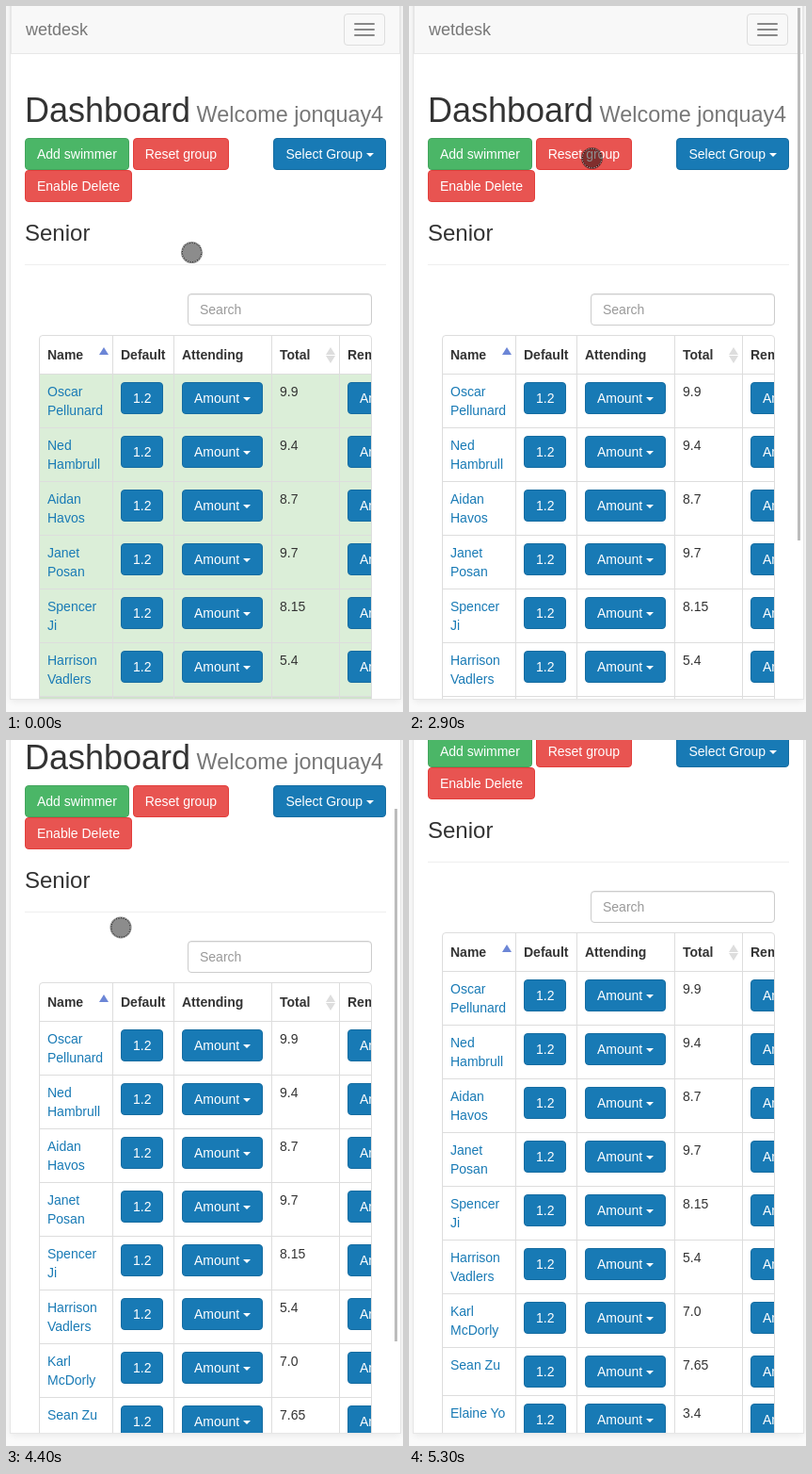
Animation of 422 by 749 pixels, one loop 5.8 s. Source, as an HTML page:

```html
<!DOCTYPE html>
<html lang="en">
<head>
<meta charset="utf-8">
<title>Dashboard</title>
<style>
* { box-sizing: border-box; }
html, body { margin: 0; width: 100%; height: 100%; overflow: hidden; }
body {
  position: relative; background: #fafafa; color: #333;
  font: 14px/20px "Liberation Sans", Arial, sans-serif;
}
#view {
  position: absolute; left: 5px; top: 0; width: 414px; height: 735px;
  overflow: hidden; background: #fff;
}
#edge {
  position: absolute; left: 5px; top: -10px; width: 414px; height: 745px;
  box-shadow: 0 0 0 1px #e6e6e6, 0 2px 8px rgba(0, 0, 0, .09);
}
#doc { position: absolute; left: -5px; top: 0; width: 422px; height: 960px; }
.at { position: absolute; white-space: nowrap; margin: 0; font-weight: 400; }
nav {
  position: absolute; left: 5px; top: -1px; width: 414px; height: 52px;
  background: #f8f8f8; border: 1px solid #e7e7e7;
}
.brand { left: 21px; top: 15px; font-size: 18px; color: #777; }
.toggle {
  left: 359px; top: 8px; width: 44px; height: 34px; padding: 9px 10px;
  border: 1px solid #ddd; border-radius: 4px;
}
.toggle i { display: block; height: 2px; margin-bottom: 4px; border-radius: 1px; background: #888; }
h1 { left: 20px; top: 91px; font-size: 36px; line-height: 39.6px; }
h1 small { font-size: 65%; line-height: 1; color: #777; }
h3 { left: 20px; top: 228px; font-size: 24px; line-height: 26.4px; }
.tools { position: absolute; left: 20px; top: 140px; width: 384px; }
.tools .right { float: right; }
.btn {
  display: inline-block; vertical-align: middle; padding: 6px 12px; white-space: nowrap;
  color: #fff; background: #187ab5; border: 1px solid #156ca1; border-radius: 4px;
}
.btn.add { background: #4bb667; border-color: #43a45c; }
.btn.red { background: #e85451; border-color: #e23e3b; }
.caret {
  display: inline-block; vertical-align: middle;
  border: 4px solid transparent; border-top-color: #fff; border-bottom: 0;
}
.rule { left: 20px; top: 274px; width: 384px; height: 1px; background: #eee; }
.search {
  left: 193px; top: 305px; width: 196px; height: 34px; padding: 6px 12px;
  color: #999; border: 1px solid #ccc; border-radius: 4px;
  box-shadow: inset 0 1px 1px rgba(0, 0, 0, .075);
}
#table {
  position: absolute; left: 35px; top: 349px; width: 354px; height: 600px;
  overflow: hidden; border: 1px solid #ddd; border-radius: 4px;
}
.row { display: grid; width: 419px; grid-template-columns: 78px 65px 104px 72px 100px; }
.row > div { padding: 8px; border-right: 1px solid #ddd; white-space: nowrap; }
.row + .row { border-top: 1px solid #ddd; }
.row .btn { display: block; width: max-content; }
.head { height: 40px; font-weight: 700; }
.head > div { padding-top: 10px; }
.name { color: #187ab5; }
.green .row:not(.head) { background: #dbeed8; }
.green .row:nth-child(8) { background: #cfe3cb; }
.tri { top: 362px; border: 5px solid transparent; border-top: 0; border-bottom: 8px solid #ddd; }
.tri.down { top: 371px; transform: scaleY(-1); }
.tri.on { border-bottom-color: #6c86d6; }
#bar {
  position: absolute; left: 413px; top: 2px; width: 3px; height: 565px;
  background: #bcbcbc;
}
#touch { position: absolute; left: -12px; top: -12px; width: 24px; height: 24px; }
</style>
</head>
<body>
<div id="edge"></div>
<div id="view">
  <div id="doc">
    <nav></nav>
    <div class="at brand">wetdesk</div>
    <div class="at toggle"><i></i><i></i><i></i></div>
    <h1 class="at">Dashboard<small> Welcome jonquay4</small></h1>
    <div class="tools">
      <span class="btn right">Select Group <i class="caret"></i></span>
      <span class="btn add">Add swimmer</span>
      <span class="btn red">Reset group</span>
      <span class="btn red">Enable Delete</span>
    </div>
    <h3 class="at">Senior</h3>
    <div class="at rule"></div>
    <div class="at search">Search</div>
    <div id="table">
      <div class="row head">
        <div>Name</div><div>Default</div><div>Attending</div><div>Total</div><div>Remaining</div>
      </div>
    </div>
    <i class="at tri on" style="left:98.5px"></i>
    <i class="at tri" style="left:339.5px"></i>
    <i class="at tri down" style="left:339.5px"></i>
  </div>
</div>
<div id="bar"></div>
<svg id="touch" viewBox="-12 -12 24 24">
  <circle r="11.5" fill="#000" fill-opacity=".45"/>
  <g fill="none">
    <circle r="10.3" stroke="#000" stroke-opacity=".75"/>
    <circle r="10.3" stroke="#fff" stroke-opacity=".75" stroke-dasharray="1.3 1.3"/>
  </g>
</svg>
<script>
const LOOP = 5800, STEP = 100;
const $ = id => document.getElementById(id);
const doc = $('doc'), table = $('table'), bar = $('bar'), touch = $('touch');
const clamp = v => Math.min(1, Math.max(0, v));
const progress = (t, from, to) => clamp((t - from) / (to - from));

const swimmers = [
  ['Oscar<br>Pellunard', '9.9'], ['Ned<br>Hambrull', '9.4'], ['Aidan<br>Havos', '8.7'],
  ['Janet<br>Posan', '9.7'], ['Spencer<br>Ji', '8.15'], ['Harrison<br>Vadlers', '5.4'],
  ['Karl<br>McDorly', '7.0'], ['Sean Zu', '7.65'], ['Elaine Yo', '3.4']
];
const amount = '<span class="btn">Amount <i class="caret"></i></span>';
table.insertAdjacentHTML('beforeend', swimmers.map(([name, total]) =>
  `<div class="row"><div class="name">${name}</div><div><span class="btn">1.2</span></div>` +
  `<div>${amount}</div><div>${total}</div><div>${amount}</div></div>`).join(''));

// Pointer strokes: quadratic curves, each starting where the last one ended
const home = [197.5, 261.5];
const strokes = [
  { from: 200, to: 500, via: [192, 252], end: [185.5, 243.5] },
  { from: 700, to: 1300, via: [143, 322], end: [159.5, 242.5] },
  { from: 1300, to: 1800, via: [213, 205], end: [194.5, 161.5] },
  { from: 3600, to: 4100, via: [120, 250], end: [115, 279.5] },
  { from: 4100, to: 4600, via: [121, 205.5], end: [126.5, 154.5] },
  { from: 4900, to: 5300, via: [115, 95], end: [40, -40] }
];

function pointer(t) {
  return strokes.reduce((p, s) => {
    const u = progress(t, s.from, s.to), v = 1 - u;
    return p.map((a, i) => v * v * a + 2 * u * v * s.via[i] + u * u * s.end[i]);
  }, home);
}

// Drag that starts softly and glides to rest
const scrollAt = t => Math.round(145 * Math.sin(Math.PI / 2 * progress(t, 4073, 4689) ** 1.3));

const flash = (t, on, off) => t < on ? 0 : 1 - progress(t, off, off + 200);

function draw(time) {
  const t = Math.floor(time % LOOP / STEP) * STEP;
  const scroll = scrollAt(t), [x, y] = pointer(t);
  doc.style.transform = `translateY(${-scroll}px)`;
  table.classList.toggle('green', t < 2900);
  bar.style.transform = `translateY(${Math.round(scroll * .768)}px)`;
  bar.style.opacity = Math.max(flash(t, 2900, 3200), flash(t, 4100, 5000));
  touch.style.transform = `translate(${x}px, ${y}px)`;
}

const start = performance.now();
(function tick() {
  draw(performance.now() - start);
  requestAnimationFrame(tick);
})();
</script>
</body>
</html>
```
